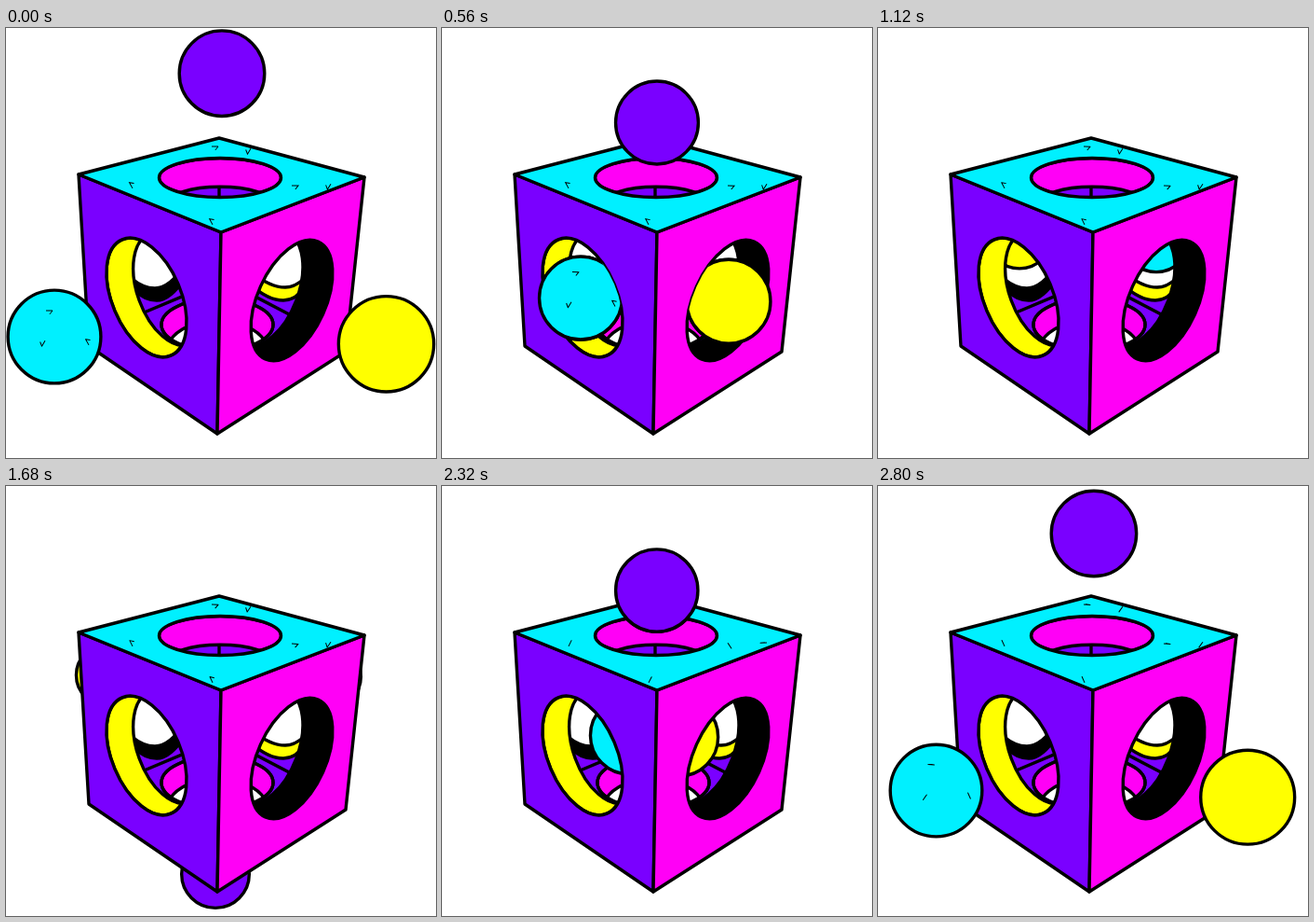
These frames come from a looping animation (462x461 px, 2.88 s). An HTML page with a canvas:

```html
<!DOCTYPE html>
<html>
<head>
<meta charset="utf-8">
<style>
html, body { margin: 0; overflow: hidden; background: #fff; }
canvas { display: block; }
</style>
</head>
<body>
<canvas id="stage" width="462" height="461"></canvas>
<script>
const W = 462, H = 461, LOOP = 2880, STEP = 80;
const VIOLET = '#7a00ff', CYAN = '#00f0ff', MAGENTA = '#ff00f6', YELLOW = '#ffff00', BLACK = '#000';
const stage = document.getElementById('stage').getContext('2d');

function ellipse(x, y, rx, ry, deg = 0) {
  const p = new Path2D();
  p.ellipse(x, y, rx, ry, deg * Math.PI / 180, 0, 7);
  return p;
}

function paint(c, path, color) {
  if (typeof path === 'string') path = new Path2D(path);
  c.lineWidth = 3.4;
  c.lineJoin = 'round';
  c.strokeStyle = BLACK;
  if (color) { c.fillStyle = color; c.fill(path); }
  c.stroke(path);
}

function cut(c, path) {
  c.globalCompositeOperation = 'destination-out';
  c.fill(path);
  c.globalCompositeOperation = 'source-over';
}

function layer(draw) {
  const canvas = document.createElement('canvas');
  canvas.width = W;
  canvas.height = H;
  draw(canvas.getContext('2d'));
  return canvas;
}

const holes = {
  left: ellipse(151, 289, 37, 67.5, -22.9),
  right: ellipse(307, 292, 36.7, 69, 24.3),
  top: ellipse(230, 160.5, 65.5, 21)
};
const floorHole = ellipse(227, 318, 60, 28);
const floorExit = ellipse(227, 345, 53, 31);

// Each window: hole wall, then what is seen past its inner rim.
const windows = [
  { hole: holes.left, wall: YELLOW, rim: ellipse(176, 280, 35, 63, -20),
    parts: [['M132 266Q146 279 160 279Q176 279 194 252V400H125Z', BLACK],
            ['M136 279Q148 292 162 292Q178 292 196 262V400H125Z', VIOLET], ['M146 306L196 285']] },
  { hole: holes.right, wall: BLACK, rim: ellipse(279, 280, 35, 64, 21),
    parts: [['M326 262Q314 278 300 278Q284 278 264 262V400H335Z', YELLOW],
            ['M324 272Q314 292 298 292Q282 292 264 276V400H335Z', VIOLET], ['M262 285L310 310']] },
  { hole: holes.top, wall: MAGENTA, rim: ellipse(230, 188.3, 57, 18),
    parts: [['M150 150H310V200H150Z', VIOLET], ['M229 160V200']] }
];

const inside = layer(c => {
  for (const { hole, wall, rim, parts } of windows) {
    c.save();
    c.clip(hole);
    paint(c, hole, wall);
    cut(c, rim);
    c.save();
    c.clip(rim);
    for (const [d, color] of parts) paint(c, d, color);
    if (hole !== holes.top) {
      paint(c, floorHole, MAGENTA);
      c.save();
      c.clip(floorHole);
      cut(c, floorExit);
      paint(c, floorExit);
      c.restore();
      paint(c, floorHole);
    }
    c.restore();
    paint(c, rim);
    c.restore();
  }
});

const faces = layer(c => {
  paint(c, 'M78 157L231 219L227 435L89 341Z', VIOLET);
  paint(c, 'M231 219L385 160L365 347L227 435Z', MAGENTA);
  paint(c, 'M78 157L229 118L385 160L231 219Z', CYAN);
  for (const hole of Object.values(holes)) {
    cut(c, hole);
    paint(c, hole);
  }
});

// Smooth periodic curve through [time, value] keys that never overshoots them.
function track(keys) {
  const n = keys.length;
  const key = i => {
    const k = keys[(i + n) % n];
    return [k[0] + LOOP * Math.floor(i / n), k[1]];
  };
  const slope = i => (key(i + 1)[1] - key(i)[1]) / (key(i + 1)[0] - key(i)[0]);
  const tangent = i => {
    const a = slope(i - 1), b = slope(i);
    return a * b > 0 ? 2 * a * b / (a + b) : 0;
  };
  return t => {
    let i = n - 1;
    while (keys[i][0] > t) i--;
    const [t0, a] = key(i), [t1, b] = key(i + 1), h = t1 - t0, s = (t - t0) / h;
    const ease = s * s * (3 - 2 * s), r = 1 - s;
    return a + (b - a) * ease + h * s * r * (r * tangent(i) - s * tangent(i + 1));
  };
}

function openSide(hole, side) {
  const p = new Path2D(side);
  p.addPath(hole);
  return p;
}

// pos runs along the axis; place gives [x, y, radius]; beyond, entering and clear compare pos.
const spheres = [
  { color: CYAN, dir: 1, beyond: 275, entering: 190, clear: 120,
    pos: track([[0, 52], [320, 96.3], [560, 149], [1120, 299], [1520, 352], [1680, 348], [2320, 201], [2800, 62.5]]),
    place: x => [x, 331 - .427 * (x - 52), 49.9 - .056 * (x - 52)],
    clip: openSide(holes.left, 'M0 0H29L179 355V461H0Z') },
  { color: YELLOW, dir: -1, beyond: 185, entering: 268, clear: 338,
    pos: track([[0, 408.5], [320, 362.3], [560, 308], [1120, 152], [1520, 103], [1680, 108], [2320, 255], [2800, 397.2]]),
    place: x => [x, 339 - .453 * (409 - x), 51.2 - .062 * (409 - x)],
    clip: openSide(holes.right, 'M462 0V461H278V355L439 0Z') },
  { color: VIOLET, dir: 1, beyond: 290, entering: 215, clear: 105,
    pos: track([[0, 48.7], [320, 68.3], [560, 101.5], [1120, 380], [1400, 434], [1680, 416], [2240, 131], [2320, 112], [2800, 51]]),
    place: y => [232 - .019 * (y - 48), y, 45.8 - .0257 * (y - 48)],
    clip: openSide(holes.top, 'M0 0H462V160H0Z') }
];

const faceMarks = [[221, 127], [263, 130], [136, 171], [307, 169], [349, 168], [222, 210]];
const ballMarks = [[-9, -28], [-10, 5], [37, 8]];

function drawMarks(spots, x, y, frame) {
  const open = frame < 28 ? .45 + .45 * Math.cos(frame * 2 * Math.PI / 7) : 0;
  stage.lineWidth = 1;
  stage.strokeStyle = BLACK;
  spots.forEach(([mx, my], i) => {
    const turn = frame * .9 + i * 2.1;
    stage.save();
    stage.translate(x + mx + 4 * Math.cos(turn), y + my + 3 * Math.sin(turn));
    stage.rotate(turn);
    stage.beginPath();
    stage.moveTo(-4, 0);
    stage.lineTo(3, 0);
    stage.lineTo(3 - 5 * Math.cos(open), 5 * Math.sin(open));
    stage.stroke();
    stage.restore();
  });
}

function drawSphere({ color, at: [x, y, r] }, frame) {
  const disc = ellipse(x, y, r, r);
  paint(stage, disc, color);
  if (color !== CYAN) return;
  stage.save();
  stage.clip(disc);
  drawMarks(ballMarks, x, y, frame);
  stage.restore();
}

function render(now) {
  const frame = Math.floor(now % LOOP / STEP);
  const balls = spheres.map(s => {
    const p = s.pos(frame * STEP), past = limit => (p - limit) * s.dir > 0;
    return { ...s, at: s.place(p), far: past(s.beyond), near: !past(s.entering), out: !past(s.clear) };
  }).sort((a, b) => a.at[2] - b.at[2]);

  stage.fillStyle = '#fff';
  stage.fillRect(0, 0, W, H);
  for (const b of balls) if (b.far) drawSphere(b, frame);
  stage.drawImage(inside, 0, 0);

  stage.save();
  const view = new Path2D();
  for (const hole of Object.values(holes)) view.addPath(hole);
  stage.clip(view);
  for (const b of balls) if (!b.far && !b.out) drawSphere(b, frame);
  stage.restore();

  stage.drawImage(faces, 0, 0);
  drawMarks(faceMarks, 0, 0, frame);
  for (const b of balls) {
    if (!b.near) continue;
    stage.save();
    if (!b.out) stage.clip(b.clip);
    drawSphere(b, frame);
    stage.restore();
  }
}

const start = performance.now();
function tick() {
  render(performance.now() - start);
  requestAnimationFrame(tick);
}
tick();
</script>
</body>
</html>
```
